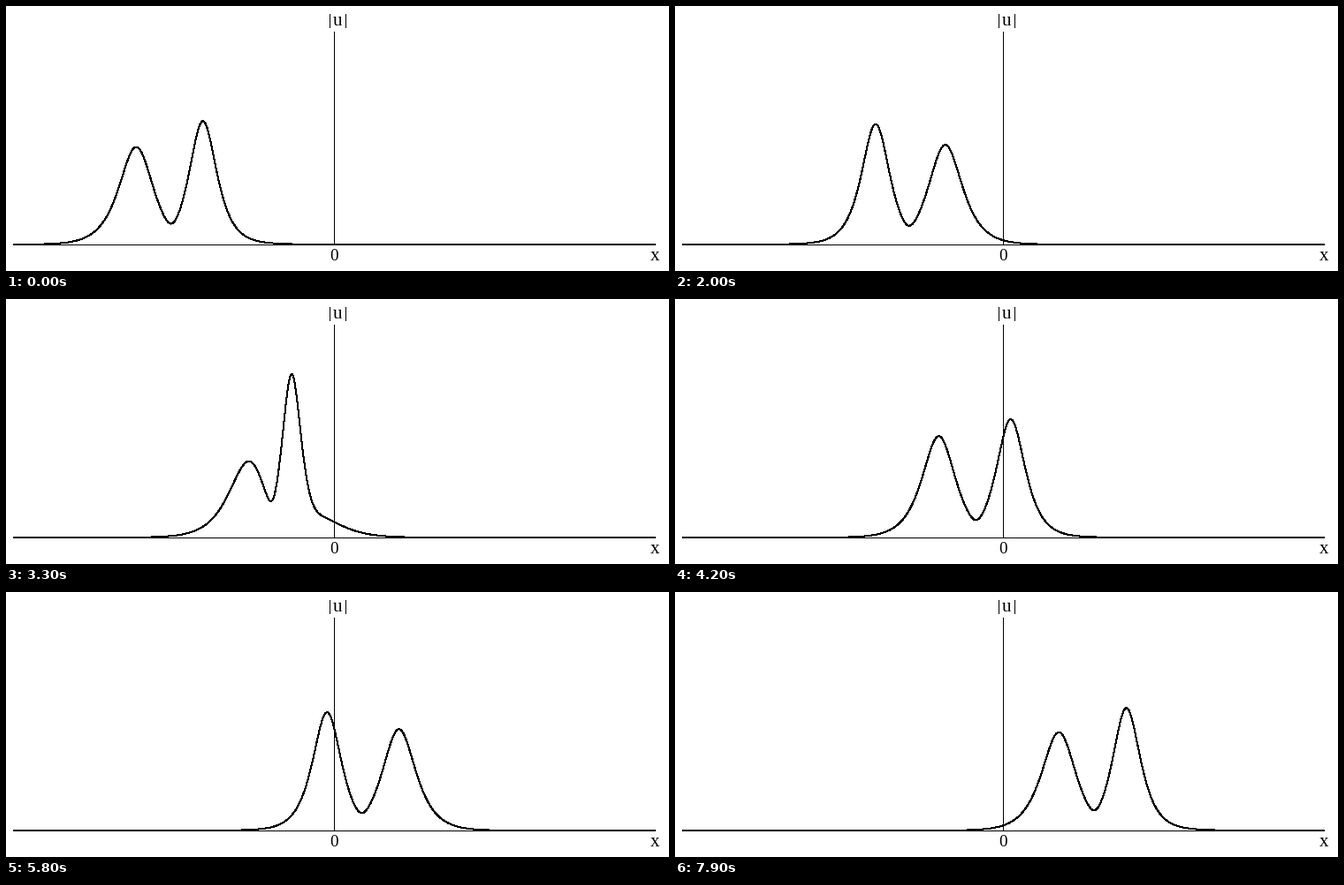
A matplotlib script that plays this animation: 750x300 px, repeating every 8000 ms.

```python
import numpy as np
import matplotlib
import matplotlib.pyplot as plt
from matplotlib.animation import FuncAnimation

matplotlib.rcParams["path.simplify"] = False

W, H, DPI = 750, 300, 100
PX = 72 / DPI                    # points per pixel
FRAMES, STEP = 80, 100           # count, ms

X0, Y0 = 371.5, 270.0            # origin on the stage
LEFT, RIGHT = 8, 735
UNIT = 18.2                      # pixels per unit of x
SPEED = 36.35                    # pixels per second
PERIOD = 3.93                    # beat period, seconds
PEAK = 243                       # highest crest, pixels
T0 = -5.0                        # start time, seconds

# Two bound solitons with equal speed: p = k + i*w
K1, W1 = 1.2, 0.35
K2, W2 = 1.05, 0.1
A, K, B = K1 + K2, K1 - K2, W1 - W2
R = (A**2 - K**2) / (A**2 + B**2)


def envelope(x, t):
    """|u| in units of its largest value, from (log F)''."""
    y = (x - X0 - SPEED * t) / UNIT
    beat = B * y - 2 * np.pi * t / PERIOD
    f = (1 - R) * np.cosh(A * y) + np.cosh(K * y) + R * np.cos(beat)
    f1 = ((1 - R) * A * np.sinh(A * y) + K * np.sinh(K * y)
          - R * B * np.sin(beat))
    f2 = ((1 - R) * A**2 * np.cosh(A * y) + K**2 * np.cosh(K * y)
          - R * B**2 * np.cos(beat))
    return np.sqrt(np.maximum(f2 / f - (f1 / f) ** 2, 0)) / A


fig = plt.figure(figsize=(W / DPI, H / DPI), dpi=DPI, facecolor="white")
ax = fig.add_axes([0, 0, 1, 1])
ax.set_xlim(0, W)
ax.set_ylim(H, 0)
ax.axis("off")


def rule(xs, ys):
    ax.plot(xs, ys, color="black", lw=PX, snap=False, solid_capstyle="butt")


def label(x, y, s, size):
    ax.text(x, y, s, family="Liberation Serif", size=size * PX,
            color="black", ha="center", va="baseline")


rule([LEFT, RIGHT], [270.5, 270.5])
rule([X0, X0], [29, 270])
rule([366.5, 366.5], [9, 25])
rule([384.5, 384.5], [9, 25])
label(375.5, 22, "u", 21)
label(371, 288, "0", 19)
label(734.5, 288, "x", 21)

# Aliased strokes fill every pixel they touch, so 1 px shows as two rows
xs = np.linspace(LEFT, RIGHT, 1455)
curve, = ax.plot([], [], color="black", lw=PX, antialiased=False, snap=False,
                 solid_capstyle="butt", solid_joinstyle="round")


def update(i):
    t = T0 + i * STEP / 1000
    curve.set_data(xs, Y0 - PEAK * envelope(xs, t))
    return curve,


anim = FuncAnimation(fig, update, frames=FRAMES, interval=STEP, repeat=True)
plt.show()
```
